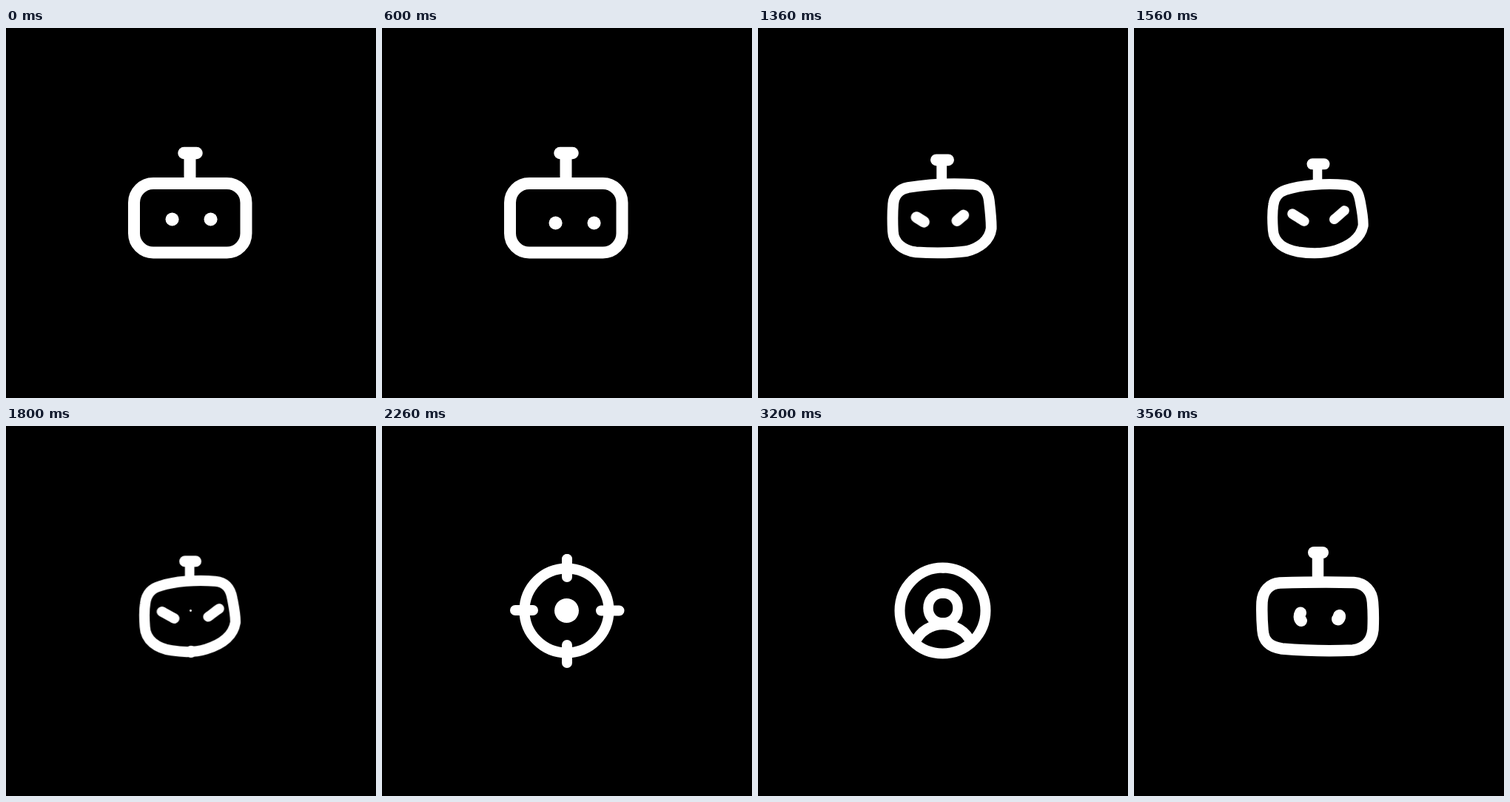
An HTML page that plays this animation: 500x500 px, repeating every 3600 ms.

```html
<!DOCTYPE html>
<html lang="en">
<head>
<meta charset="utf-8">
<title>Icon morph</title>
<style>
  html, body { margin: 0; width: 100%; height: 100%; overflow: hidden; background: #000; }
  svg { display: block; width: 100%; height: 100%; }
  path { fill: none; stroke: #fff; stroke-linecap: round; stroke-linejoin: round; }
  g, path, circle {
    animation: 3600ms cubic-bezier(.4, 0, .15, 1) infinite;
    transform-origin: 249.5px 249.5px;
  }

  /* Poses: robot, cross robot, crosshair, magnifier, person, robot again */
  #icon { animation-name: settle; }
  #ring { animation-name: ring; }
  #stem { animation-name: stem; }
  #cap { animation-name: cap; }
  #left { animation-name: left; }
  #right { animation-name: right; }
  #base { animation-name: base; }
  #dot { animation-name: dot; fill: #fff; }
  #eyes { animation-name: look; }

  @keyframes settle {
    0%, 48.06% { transform: scale(1); }
    55.56% { transform: scale(1.04); }
    60%, 100% { transform: scale(1); }
  }

  @keyframes look {
    0%, 2.78% { transform: translate(0, 0); }
    16.67%, 18.33% { transform: translate(10px, 5px); }
    30.56%, 33.33% { transform: translate(-10px, 5px); }
    45%, 100% { transform: translate(0, 0); }
  }

  @keyframes ring {
    0%, 33.33% {
      stroke-width: 16;
      d: path("M199 210 C232 210 265 210 298.5 210 C312.9 210 324.5 221.6 324.5 236 C324.5 250 324.5 264 324.5 277.5 C324.5 291.9 312.9 303.5 298.5 303.5 C265 303.5 232 303.5 199 303.5 C184.6 303.5 173 291.9 173 277.5 C173 264 173 250 173 236 C173 221.6 184.6 210 199 210 Z");
    }
    45%, 48.06% {
      stroke-width: 14;
      d: path("M205 219 C225 212 258 209.5 286 212 C298 213.5 302.5 220 305 232 C307.5 245 310 257 309.5 267 C306 285 290 294 272 300.5 C257 305 238 305 222 302.5 C203 299 189 290 188 273 C187 260 187 248 188.5 239 C190 228 196 222 205 219 Z");
    }
    60%, 62.78% {
      stroke-width: 14;
      d: path("M249.5 192.5 C249.5 192.5 249.5 192.5 249.5 192.5 C281 192.5 306.5 218 306.5 249.5 C306.5 249.5 306.5 249.5 306.5 249.5 C306.5 281 281 306.5 249.5 306.5 C249.5 306.5 249.5 306.5 249.5 306.5 C218 306.5 192.5 281 192.5 249.5 C192.5 249.5 192.5 249.5 192.5 249.5 C192.5 218 218 192.5 249.5 192.5 Z");
    }
    72.22%, 91.67% {
      stroke-width: 14;
      d: path("M249.5 191.5 C249.5 191.5 249.5 191.5 249.5 191.5 C281.5 191.5 307.5 217.5 307.5 249.5 C307.5 249.5 307.5 249.5 307.5 249.5 C307.5 281.5 281.5 307.5 249.5 307.5 C249.5 307.5 249.5 307.5 249.5 307.5 C217.5 307.5 191.5 281.5 191.5 249.5 C191.5 249.5 191.5 249.5 191.5 249.5 C191.5 217.5 217.5 191.5 249.5 191.5 Z");
    }
    98.89%, 100% {
      stroke-width: 15.5;
      d: path("M197 212 C230 211 265 210.5 297 211.5 C312 212.5 321.5 223 322.5 238 C323.5 250 323.5 264 323 275 C321.5 291 311 301 296 303 C265 304.5 230 303.5 200 301 C183 298.5 175 291 174 276 C173 264 172.5 250 173 238 C174 223 183 213 197 212 Z");
    }
  }

  @keyframes stem {
    0%, 33.33% { stroke-width: 16; d: path("M248.5 169 L248.5 206"); }
    45%, 48.06% { stroke-width: 12.5; d: path("M248 184 L248 206"); }
    60%, 62.78% { stroke-width: 14; d: path("M250 180 L250 204"); }
    72.22%, 91.67% { stroke-width: 13; d: path("M250 192 L250 192.1"); }
    98.89%, 100% { stroke-width: 15.5; d: path("M248.5 171 L248.5 206"); }
  }

  @keyframes cap {
    0%, 33.33% { stroke-width: 16.5; d: path("M240.5 169 L257.5 169"); }
    45%, 48.06% { stroke-width: 15; d: path("M241 184 L257 184"); }
    60%, 62.78% { stroke-width: 14; d: path("M250 180 L250.1 180"); }
    72.22%, 91.67% { stroke-width: 13; d: path("M250 192 L250.1 192"); }
    98.89%, 100% { stroke-width: 16; d: path("M243 171 L255 171"); }
  }

  /* Eye, crosshair tick, glint, half of the head */
  @keyframes left {
    0%, 33.33% { stroke-width: 18; d: path("M224.5 258.5 C224.5 258.5 224.6 258.5 224.6 258.5"); }
    45%, 48.06% { stroke-width: 13.5; d: path("M214 251 C219 254 225 258 230 261"); }
    60%, 62.78% { stroke-width: 14; d: path("M180 249 C188 249 196 249 204 249"); }
    72.22%, 76.67% { stroke-width: 14; d: path("M219 240 C221 231 227 224 234.5 220"); }
    88.89%, 91.67% { stroke-width: 13.5; d: path("M250 266 C223.3 266 223.3 226 250 226"); }
    98.89%, 100% { stroke-width: 16; d: path("M226 263 C223 261 223 256 225 252.5"); }
  }

  @keyframes right {
    0%, 33.33% { stroke-width: 18; d: path("M276.5 258.5 C276.5 258.5 276.6 258.5 276.6 258.5"); }
    45%, 48.06% { stroke-width: 13; d: path("M270.5 258.5 C275 255 280 250 284.5 246.5"); }
    60%, 62.78% { stroke-width: 14; d: path("M296 249.5 C304 249.5 312 249.5 320.5 249.5"); }
    72.22%, 76.67% { stroke-width: 14.5; d: path("M264 216.5 C265 217 267 218 268.5 218.5"); }
    88.89%, 91.67% { stroke-width: 13.5; d: path("M250 226 C276.7 226 276.7 266 250 266"); }
    98.89%, 100% { stroke-width: 17; d: path("M277.5 256.5 C278 259 276 261 275.5 261"); }
  }

  /* Lower tick, handle, shoulders */
  @keyframes base {
    0%, 48.06% { d: path("M250 304 C250 304 250 304 250 304.1"); }
    60%, 62.78% { d: path("M250 320 C250 312 250 304 250 296"); }
    72.22%, 76.67% { d: path("M170 329 C183 316 195 304 208 292"); }
    88.89%, 91.67% { d: path("M212 293 C226 260 274 260 288 293"); }
    98.89%, 100% { d: path("M250 304 C250 304 250 304 250 304.1"); }
  }

  @keyframes dot {
    0%, 48.06% { transform: scale(0); }
    60%, 62.78% { transform: scale(1); }
    72.22%, 100% { transform: scale(0); }
  }
</style>
</head>
<body>
<svg viewBox="0 0 500 500">
  <g id="icon">
    <path id="ring"/>
    <path id="stem"/>
    <path id="cap"/>
    <path id="base" stroke-width="14"/>
    <circle id="dot" cx="249.5" cy="249.5" r="16.5"/>
    <g id="eyes">
      <path id="left"/>
      <path id="right"/>
    </g>
  </g>
</svg>
</body>
</html>
```
